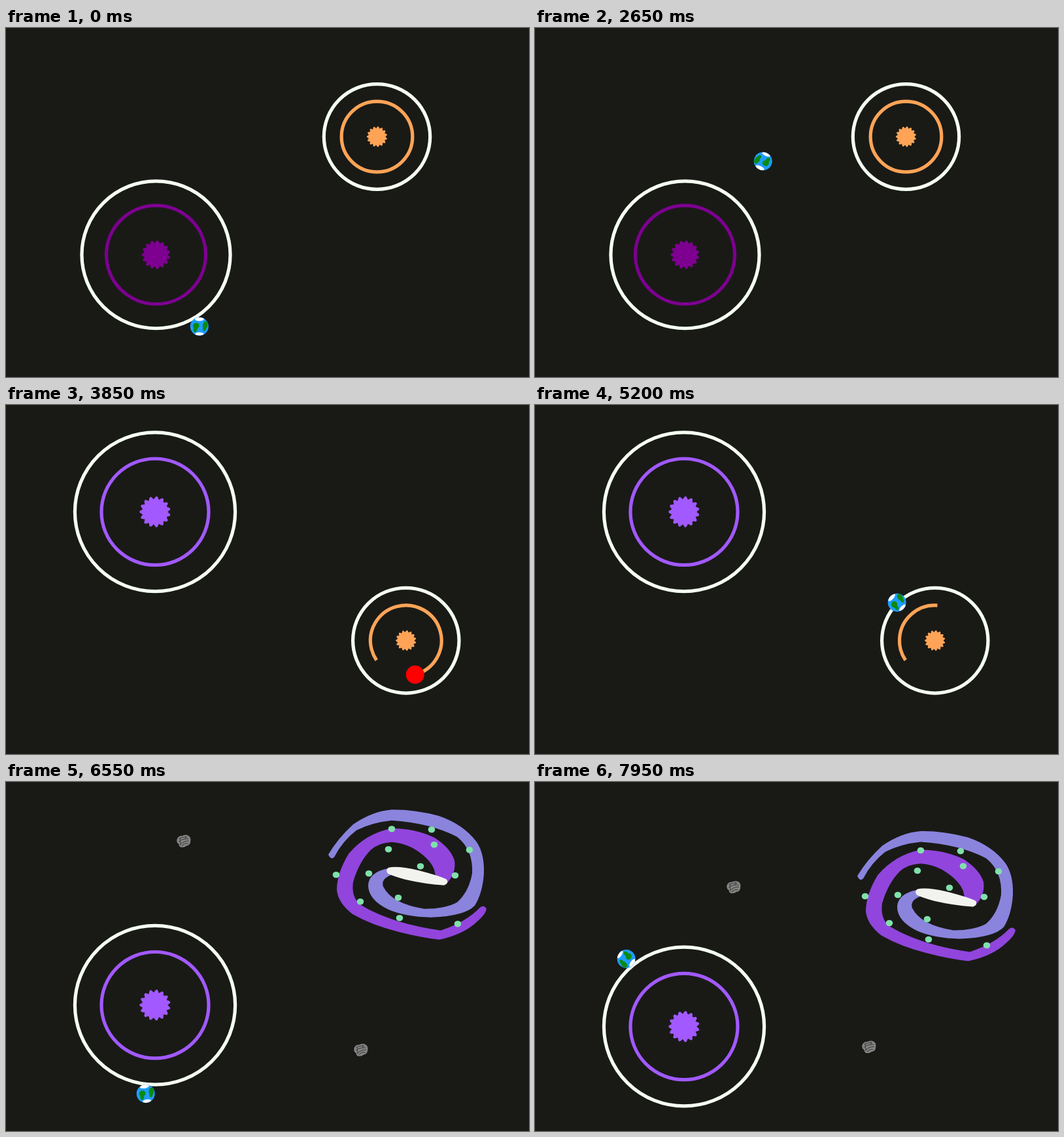
An HTML page with a canvas for the animation above (8 s loop, 800 px wide and 533 px high).

```html
<!DOCTYPE html>
<html lang="en">
<head>
<meta charset="utf-8">
<title>Orbit hop</title>
<style>
html, body { margin: 0; width: 100%; height: 100%; overflow: hidden; background: #191a16; }
canvas { display: block; width: 100vw; height: 100vh; }
</style>
</head>
<body>
<canvas id="stage" width="800" height="533"></canvas>
<script>
const ctx = document.getElementById('stage').getContext('2d');
const LOOP = 8000, STEP = 50;
const LAUNCH_1 = 2146, LAND_1 = 3140, DIP = 3357, LAUNCH_2 = 4969, LAND_2 = 6160;
const SPIN = 0.0953, INNER_SPIN = 0.144, FLY = 0.268, PAN = 590;

const VIOLET = { x: 229.5, y: 346.3, r: 113, color: '#7d0090' };
const ORANGE = { x: 567.5, y: 166, r: 80.8, color: '#ffa457' };
const ORANGE_LOW = { ...ORANGE, x: 611.8, y: 359.7 };
const LILAC_HIGH = { x: 228, y: 163.2, r: 122, color: '#a259ff' };
const LILAC = { ...LILAC_HIGH, y: 373.5 };

const ARM_BLUE = new Path2D(`M493 111 Q508 86 531 65 Q560 45 590 42.500 Q625 42 662 52 Q700 65 720 92
  Q732 110 731 140 Q729 170 717 189 Q702 205 650 207 Q610 206 585 195 Q554 180 554 158 Q555 138 585 132
  L590 142 Q573 148 577 160 Q590 186 640 194 Q672 194 690 184 Q708 168 713 140 Q715 104 690 84
  Q650 63 590 59 Q560 62 536 74 Q515 90 502 115 Q497 120 493 111Z`);
const ARM_VIOLET = new Path2D(`M674 155 Q689 140 686 120 Q680 101 655 85 Q625 71 590 71 Q550 79 524 110
  Q506 140 506 165 Q508 185 530 202 Q560 219 600 229 Q635 238 663 241 Q700 233 720 214
  Q734 202 735 194 Q731 187 725 192 Q704 214 665 227 Q630 222 600 213 Q560 200 540 186
  Q528 174 531 153 Q540 122 558 104 Q570 93 590 92 Q606 93 622 101 Q648 116 655 134 L658 148Z`);
const BAR = new Path2D(`M585 131 Q600 128 630 135 Q665 144 674 149 Q678 155 670 158
  Q640 156 610 149 Q592 144 584 140 Q580 135 585 131Z`);
const STARS = [[590, 72], [651, 73], [655, 96], [709, 104], [585, 103], [634, 129], [687, 143],
  [505, 142], [555, 140], [600, 177], [542, 183], [602, 208], [691, 217]];
const ROCK = new Path2D('M-10 -4 Q-7 -9 -2 -8 Q4 -10 8 -7 Q12 -4 10 2 Q9 8 3 8 Q-2 11 -7 8 Q-9 6 -8 4 Q-12 1 -10 -4Z');
const ROCK_LINES = new Path2D('M-7 -4 Q-2 -7 6 -5 M-8 0 Q-1 -4 8 -2 M-6 4 Q0 0 8 1 M-4 7 Q1 3 6 5 M-5 -6 L-6 6 M4 -7 L3 -2');

const rad = deg => deg * Math.PI / 180;
const clamp = (v, lo, hi) => Math.min(hi, Math.max(lo, v));
const easeInOut = u => u < 0.5 ? 4 * u ** 3 : 1 - 4 * (1 - u) ** 3;
const polar = (c, r, deg) => ({ x: c.x + r * Math.cos(rad(deg)), y: c.y + r * Math.sin(rad(deg)) });

function at(x, y, turn, draw) {
  ctx.save();
  ctx.translate(x, y);
  ctx.rotate(rad(turn));
  draw();
  ctx.restore();
}

// Rings are a touch wider than tall
function ring(x, y, r, color, from = 0, to = 360, ccw = false) {
  ctx.strokeStyle = color;
  ctx.lineWidth = 5.2;
  ctx.beginPath();
  ctx.ellipse(x, y, r * 1.005, r * 0.995, 0, rad(from), rad(to), ccw);
  ctx.stroke();
}

function blob(x, y, rx, ry, color, turn = 0) {
  ctx.fillStyle = color;
  ctx.beginPath();
  ctx.ellipse(x, y, rx, ry, rad(turn), 0, 2 * Math.PI);
  ctx.fill();
}

// Small core with fifteen slanted teeth
function core({ x, y, r, color }) {
  ctx.beginPath();
  for (let i = 0; i < 15; i++) {
    for (const [turn, size] of [[0, 0.158], [9, 0.192], [15, 0.194]]) {
      const p = polar({ x, y }, r * size, i * 24 + turn);
      ctx.lineTo(p.x, p.y);
    }
  }
  ctx.closePath();
  ctx.fillStyle = color;
  ctx.fill();
}

function system(s, eatenTo) {
  const inner = s.r * 0.669;
  ring(s.x, s.y, s.r, '#f5fff2');
  if (eatenTo === undefined) ring(s.x, s.y, inner, s.color);
  else ring(s.x, s.y, inner, s.color, eatenTo, 146 - 360, true);
  core(s);
}

function globe({ x, y, turn, burning }) {
  if (burning) return blob(x, y, 14, 14, '#ff0000');
  at(x, y, turn, () => {
    blob(0, 0, 14, 14, '#1e9cff');
    ctx.beginPath();
    ctx.arc(0, 0, 14, 0, 2 * Math.PI);
    ctx.clip();
    blob(0, -11, 7, 2.8, '#ffffff');
    blob(0, 11.5, 6.5, 2.5, '#ffffff');
    blob(-5, -1, 5, 4.5, '#0b8a12', -20);
    blob(-6, 4, 3, 5, '#0b8a12', 15);
    blob(9, -2, 3.8, 6, '#0b8a12', 10);
    blob(8, 3, 2.5, 4, '#0b8a12', 20);
  });
}

function galaxy() {
  for (const [path, color] of [[ARM_BLUE, '#8a84dd'], [ARM_VIOLET, '#9145dc'], [BAR, '#f2f3ef']]) {
    ctx.fillStyle = color;
    ctx.fill(path);
  }
  for (const [x, y] of STARS) blob(x, y, 5.3, 4.8, '#80e0ab');
}

function rock(x, y) {
  at(x, y, -8, () => {
    ctx.fillStyle = '#858585';
    ctx.fill(ROCK);
    ctx.strokeStyle = '#3c3c3a';
    ctx.lineWidth = 1;
    ctx.stroke(ROCK_LINES);
  });
}

// Leaves a circle along its tangent; dir is 1 clockwise, -1 counterclockwise
function fly(center, r, angle, dir, time) {
  const p = polar(center, r, angle);
  return polar(p, FLY * time, angle + 90 * dir);
}

function violetScene(t) {
  system(VIOLET);
  system(ORANGE);
  const angle = 58.8 + SPIN * Math.min(t, LAUNCH_1);
  const p = fly(VIOLET, 128, angle, 1, Math.max(0, t - LAUNCH_1));
  globe({ ...p, turn: angle - 58.8 });
}

function orangeScene(t) {
  const burning = t >= DIP && t < LAUNCH_2;
  const angle = t < DIP
    ? 146 + 0.0875 * (DIP - t)
    : 146 - INNER_SPIN * (Math.min(t, LAUNCH_2) - DIP);
  system(LILAC_HIGH);
  system(ORANGE_LOW, t < DIP ? undefined : angle);
  const p = fly(ORANGE_LOW, t < DIP ? 94 : 54, angle, -1, Math.max(0, t - LAUNCH_2));
  globe({ ...p, turn: 39.5 + angle, burning });
}

function galaxyScene(t) {
  at(0, 32.5, 0, galaxy);
  system(LILAC);
  const drift = (t - 7950) / 1400;
  const dx = -103.5 + 32 * drift, dy = -122 + 37.5 * drift;
  rock(407.5 + dx, 282.3 + dy);
  rock(407.5 - dx, 282.3 - dy);
  const angle = 58.9 + SPIN * (t - LAND_2);
  globe({ ...polar(LILAC, 136, angle), turn: angle - 105.4 });
}

const SCENES = [
  { start: 0, draw: violetScene, from: [0, 0] },
  { start: LAND_1, draw: orangeScene, from: [-44.5, -193.7] },
  { start: LAND_2, draw: galaxyScene, from: [0, -210.3] }
];

function render(t) {
  ctx.fillStyle = '#191a16';
  ctx.fillRect(0, 0, 800, 533);
  const scene = SCENES.findLast(s => t >= s.start);
  const left = 1 - easeInOut(clamp((t - scene.start) / PAN, 0, 1));
  at(scene.from[0] * left, scene.from[1] * left, 0, () => scene.draw(t));
}

const begin = performance.now();
function tick() {
  const t = (performance.now() - begin) % LOOP;
  render(Math.floor(t / STEP) * STEP);
  requestAnimationFrame(tick);
}
tick();
</script>
</body>
</html>
```
